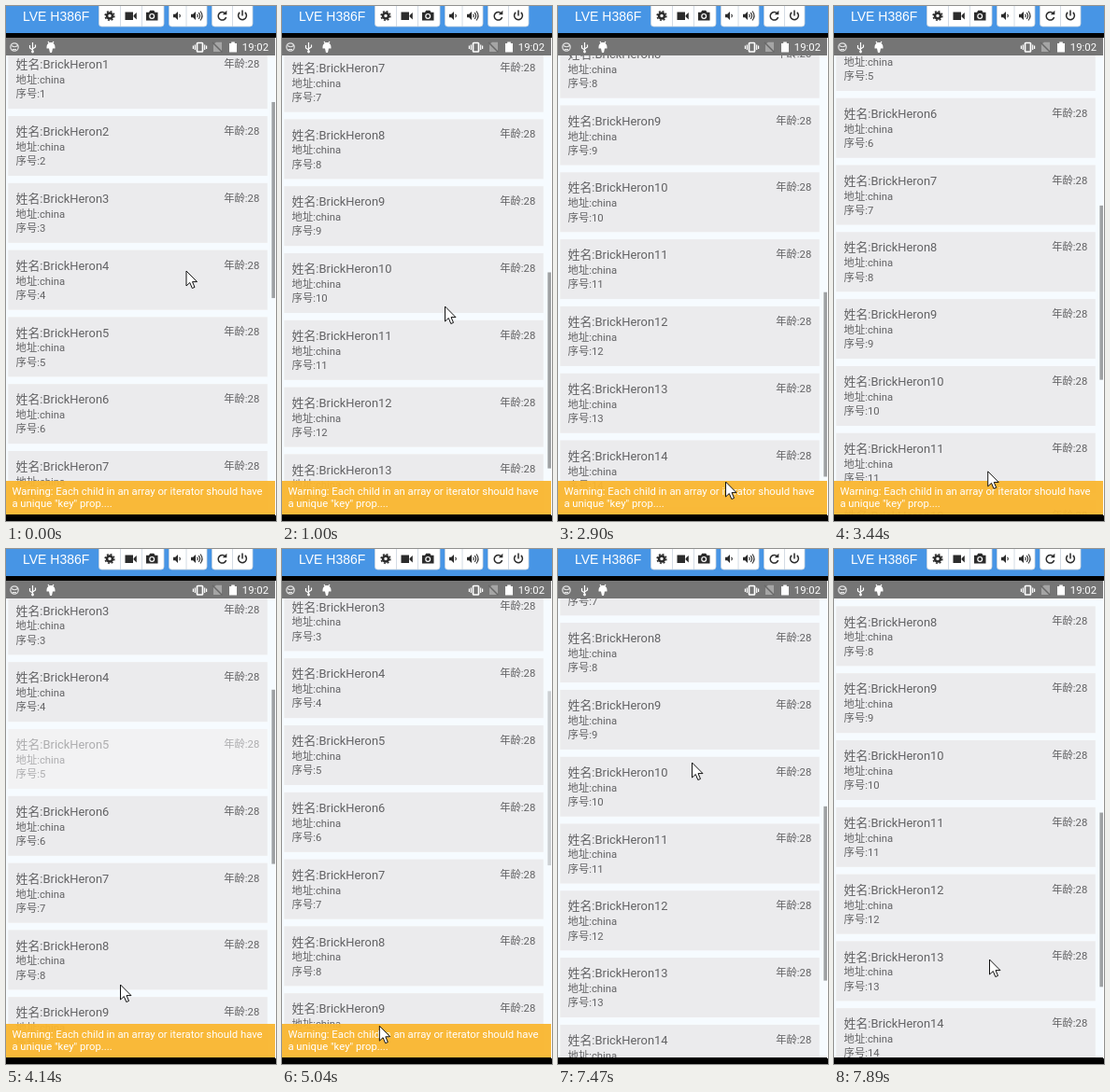
Recreate the animation shown at these times as an HTML page. Size 289 by 552 pixels, loop 8000 ms.

```html
<!DOCTYPE html>
<html lang="zh">
<head>
<meta charset="utf-8">
<title>List demo</title>
<style>
  html, body { margin: 0; width: 100%; height: 100%; overflow: hidden; background: #000; }
  svg { display: block; width: 289px; height: 552px; }
  text { font-family: Roboto, "Noto Sans CJK SC", "Noto Sans CJK", sans-serif; font-size: 11.3px; white-space: pre; }
  .device { font: 14px "Liberation Sans", Arial, sans-serif; fill: #fff; }
  .card text { fill: #626264; }
  .card .name { font-size: 12.9px; }
  .light text { fill: #fff; }
  .light .soft { fill-opacity: .75; }
  .light .bold { font-size: 12.95px; font-weight: 700; }
  .mid { text-anchor: middle; }
  .end { text-anchor: end; }
  .ink { fill: #2b2b2b; }
  .line { fill: none; stroke: #2b2b2b; stroke-width: 1.5; }
  .pale { fill: none; stroke: #fff; stroke-width: 1.2; }
</style>
</head>
<body>
<svg viewBox="0 0 289 552">
  <defs>
    <clipPath id="screen"><rect y="53" width="288" height="492"/></clipPath>
    <path id="speaker" class="ink" d="M0 9.3H2.2L5 6.5V15.5L2.2 12.7H0Z"/>
    <path id="wave" class="line" style="stroke-width:1.1" d="M0 9.3Q1.7 11 0 12.7"/>
  </defs>
  <rect width="289" height="552"/>

  <!-- Device toolbar -->
  <rect width="289" height="29" fill="#4795e5"/>
  <text class="device" x="18" y="16">LVE H386F</text>
  <g fill="#fff" stroke="#c9d3de" stroke-width=".8">
    <rect x="99.5" y="-4" width="69.5" height="26" rx="3"/>
    <rect x="174.5" y="-4" width="40.5" height="26" rx="3"/>
    <rect x="220.5" y="-4" width="43.5" height="26" rx="3"/>
    <path d="M122.5 0V22M145.5 0V22M193 0V22M242.5 0V22"/>
  </g>
  <g transform="translate(0 -.5)">
    <circle class="line" cx="111" cy="11" r="3" style="stroke-width:2.6"/>
    <circle class="line" cx="111" cy="11" r="4.9" stroke-dasharray="1.95 1.9"/>
    <path class="ink" d="M127.5 7H136V15.5H127.5ZM136.6 10.5L139.8 7.5V15L136.6 12Z"/>
    <path class="ink" d="M150 7.3H153L154.2 5.3H158.3L159.5 7.3H162.5V16H150Z"/>
    <circle cx="156.2" cy="11.4" r="2.4" fill="none" stroke="#fff" stroke-width="1.2"/>
    <use href="#speaker" x="179"/><use href="#wave" x="185.5"/>
    <use href="#speaker" x="198"/><use href="#wave" x="204.4"/>
    <path class="line" style="stroke-width:1.1" d="M206.2 7.6Q209 11 206.2 14.4M208 6Q212 11 208 16"/>
    <path class="line" d="M234.6 8.3A4.3 4.3 0 1 0 235.6 12.5"/>
    <path class="ink" d="M236.3 5.2V9.7H231.8Z"/>
    <path class="line" d="M250.2 7.4A4.4 4.4 0 1 0 255.8 7.4M253 5V11"/>
  </g>

  <!-- Phone screen -->
  <rect x="288" y="34" width="1" height="512" fill="#fff"/>
  <g clip-path="url(#screen)">
    <rect y="53" width="288" height="492" fill="#f6fbff"/>
    <g id="list"></g>
    <rect id="thumb" x="284.4" width="3.6" fill="#000" fill-opacity=".36"/>
    <g id="banner" class="light">
      <rect y="509" width="288" height="36" fill="#fab730" fill-opacity=".95"/>
      <text x="6.4" y="524.3">Warning: Each child in an array or iterator should have</text>
      <text x="6.4" y="537.3">a unique "key" prop....</text>
    </g>
    <g id="report" class="light">
      <rect y="53" width="288" height="492" fill="#fab730" fill-opacity=".95"/>
      <rect y="496" width="288" height="49" fill="#fab730" fill-opacity=".9"/>
      <text class="soft" x="6.4" y="82">Warning encountered 1 time.</text>
      <path d="M209.5 75V81L217 78Z" fill="#fff" fill-opacity=".8"/>
      <text class="soft end" x="274" y="82">Stacktrace</text>
      <g id="trace"></g>
      <text class="soft mid" x="43" y="525">Minimize</text>
      <text class="soft mid" x="141" y="525">Dismiss</text>
      <text class="soft mid" x="239" y="525">Dismiss All</text>
    </g>
  </g>

  <!-- Status bar -->
  <rect y="34" width="288" height="19" fill="#757575"/>
  <circle class="pale" cx="9" cy="44" r="4.2" opacity=".8"/>
  <path class="pale" opacity=".8" d="M6 42.5Q9 45 12.5 42.5M7 46.5H11"/>
  <path class="pale" d="M28.5 39V49M25.5 42V45L28.5 47M31.5 41.5V44L28.5 46"/>
  <circle cx="28.5" cy="49" r="1.4" fill="#fff"/>
  <path d="M43.5 44A4.5 5 0 0 1 52.5 44V45.5H50L49 50H47L46 45.5H43.5Z" fill="#fff"/>
  <path class="pale" d="M45 38L46.3 40M51 38L49.7 40"/>
  <rect class="pale" x="204.5" y="39.5" width="6" height="9.5" rx=".8" style="stroke-width:1.7"/>
  <path class="pale" d="M202.3 41.5V47M200.4 42.5V46M212.7 41.5V47M214.6 42.5V46"/>
  <path d="M222 41L225 38.8H231V49H222Z" fill="#a5a5a5"/>
  <path d="M221 39L231.5 49.5" stroke="#686868" stroke-width="1.5"/>
  <path d="M239 40H241.2V38.5H244.8V40H247V49.5H239Z" fill="#fff"/>
  <text class="end" x="281" y="48.3" fill="#fff">19:02</text>

  <path id="cursor" d="M0 0V16L3.8 12.5 6.3 18.5 9 17.4 6.5 11.6H11.5Z" fill="#fff" stroke="#111"/>
</svg>

<script>
const LOOP = 8000, REFRESH = 138;
const TOP = 54, VIEW = 492, PITCH = 71.8, HEADER = 35;
const REPORT_OPENS = 5350, REPORT_CLOSES = 6510, PRESS = 4140;
const $ = id => document.getElementById(id);
const clamp = value => Math.min(1, Math.max(0, value));
const easeOut = part => 1 - (1 - part) ** 2;
const easeInOut = part => part * part * (3 - 2 * part);

const firstScroll = 114.6;
const swipes = [
  { start: 0, end: 966, by: 427.4 },
  { start: 2250, end: 2760, by: 86.7 },
  { start: 2898, end: 4140, by: -373.7 },
  { start: 4400, end: 4540, by: 4 },
  { start: 6642, end: 7690, by: 343 }
];
const cursorStops = [
  { at: 0, x: 193, y: 284 },
  { at: 966, x: 174.5, y: 322 },
  { at: 1540, x: 172, y: 197 },
  { at: 2898, x: 179.5, y: 510 },
  { at: 4140, x: 122.5, y: 467 },
  { at: 5040, x: 104, y: 512 },
  { at: 6110, x: 142.5, y: 522 },
  { at: 6510, x: 142.5, y: 522 },
  { at: 7452, x: 143.5, y: 229 },
  { at: 7866, x: 166.5, y: 440 }
];

function scrollAt(time) {
  return swipes.reduce((sum, { start, end, by }) =>
    sum + by * easeOut(clamp((time - start) / (end - start))), firstScroll);
}

// The scroll bar stays a moment after each swipe, then fades.
function thumbOpacity(time) {
  return Math.max(...swipes.map(({ start, end }) =>
    time < start ? 0 : clamp(1 - (time - end - 300) / 250)));
}

function cursorAt(time) {
  const next = cursorStops.findIndex(stop => stop.at > time);
  if (next < 0) return cursorStops[cursorStops.length - 1];
  const a = cursorStops[next - 1], b = cursorStops[next];
  const part = easeInOut((time - a.at) / (b.at - a.at));
  return { x: a.x + (b.x - a.x) * part, y: a.y + (b.y - a.y) * part };
}

$("list").innerHTML = Array.from({ length: 18 }, (_, n) => `
  <g transform="translate(0 ${n * PITCH})">
    <rect x="2.3" width="277.5" height="64" fill="#fafafb"/>
    <g class="card">
      <rect x="2.3" width="277.5" height="64" fill="#ebebed"/>
      <text class="name" x="10.6" y="21.2">姓名:BrickHeron${n}</text>
      <text x="10.6" y="37">地址:china</text>
      <text x="10.6" y="52.3">序号:${n}</text>
      <text class="end" x="271.3" y="20">年龄:28</text>
    </g>
  </g>`).join("");
const pressedCard = document.querySelectorAll(".card")[5];

const trace = `Warning: Each child in an array or iterator
should have a unique "key" prop.

Check the render method of \`VirtualizedList\`.
See https://fb.me/react-warning-keys for
more information.
    in CellRenderer (at VirtualizedList.js:463)
    in VirtualizedList (at FlatList.js:556)
    in FlatList (at flatlistdemo.js:44)
    in RCTView (at View.js:113)
    in View (at flatlistdemo.js:43)
    in List (at index.android.js:20)
    in RCTView (at View.js:113)
    in View (at index.android.js:19)
    in FlatListDemo (at renderApplication.js:35)
    in RCTView (at View.js:113)
    in View (at AppContainer.js:100)
    in RCTView (at View.js:113)
    in View (at AppContainer.js:121)
    in AppContainer (at renderApplication.js:
34)`;
$("trace").innerHTML = trace.split("\n").map((line, i) =>
  `<text class="bold" x="6.4" y="${98.3 + i * 15.15}">${line}</text>`).join("");

function show(id, visible) {
  $(id).style.display = visible ? "" : "none";
}

function draw(clock) {
  const time = Math.floor(clock / REFRESH) * REFRESH;
  const scroll = scrollAt(time);
  const { x, y } = cursorAt(time);

  // The list grows as more rows get rendered.
  const rows = 16 + swipes.slice(1, 3).filter(swipe => time > swipe.start).length;
  const ratio = VIEW / (rows * 72);
  $("list").setAttribute("transform", `translate(0 ${TOP + HEADER - scroll})`);
  $("thumb").setAttribute("y", TOP + scroll * ratio);
  $("thumb").setAttribute("height", VIEW * ratio);
  $("thumb").style.opacity = thumbOpacity(time);
  pressedCard.style.opacity = 1 - .5 * clamp(1 - Math.abs(time - PRESS) / 200);
  $("cursor").setAttribute("transform", `translate(${x} ${y})`);
  show("banner", clock < REPORT_OPENS);
  show("report", clock >= REPORT_OPENS && clock < REPORT_CLOSES);
}

const start = performance.now();
function tick() {
  draw((performance.now() - start) % LOOP);
  requestAnimationFrame(tick);
}
tick();
</script>
</body>
</html>
```
